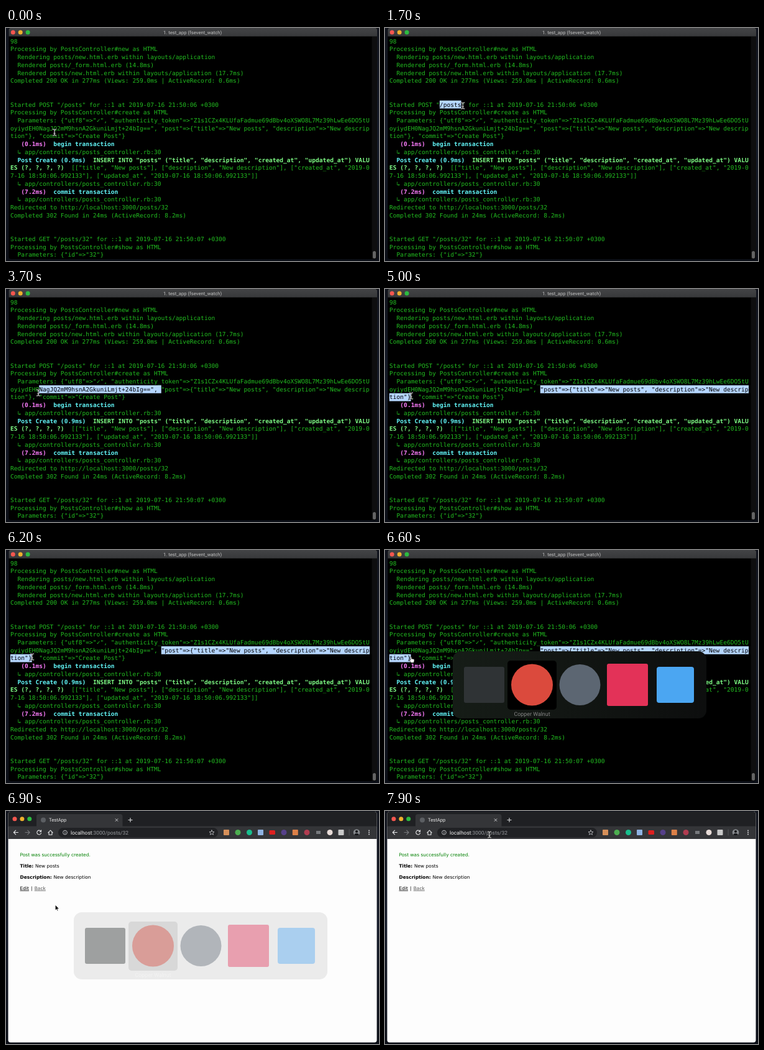
An HTML page with a canvas that plays this animation: 600x375 px, repeating every 8 s.

```html
<!DOCTYPE html>
<html lang="en">
<head>
<meta charset="utf-8">
<title>Terminal and browser</title>
<style>
html, body { margin: 0; width: 100%; height: 100%; overflow: hidden; background: #0d111a; }
canvas { display: block; width: 600px; height: 375px; }
</style>
</head>
<body>
<canvas id="stage"></canvas>
<script>
const canvas = document.getElementById('stage');
const ctx = canvas.getContext('2d');
const dpr = window.devicePixelRatio || 1;
canvas.width = 600 * dpr;
canvas.height = 375 * dpr;
ctx.scale(dpr, dpr);
ctx.textRendering = 'geometricPrecision';

const LOOP = 8000, STEP = 100;
const SWITCHER_ON = 6300, BROWSER_ON = 6700, FOCUS_ON = 6800, SWITCHER_OFF = 7100;
const MONO = '"DejaVu Sans Mono", monospace';
const SANS = 'Roboto, "Liberation Sans", sans-serif';
const PAGE = '"DejaVu Sans", sans-serif';

// ---------- drawing helpers ----------
function rect(x, y, w, h, fill, r = 0) {
  ctx.fillStyle = fill;
  ctx.beginPath();
  ctx.roundRect(x, y, w, h, r);
  ctx.fill();
}
function dot(x, y, r, fill) {
  ctx.fillStyle = fill;
  ctx.beginPath();
  ctx.arc(x, y, r, 0, Math.PI * 2);
  ctx.fill();
}
function label(str, x, y, font, fill, align = 'left') {
  ctx.font = font;
  ctx.fillStyle = fill;
  ctx.textAlign = align;
  ctx.fillText(str, x, y);
  return ctx.measureText(str).width;
}
function stroke(d, color, width = 1) {
  ctx.strokeStyle = color;
  ctx.lineWidth = width;
  ctx.stroke(new Path2D(d));
}
function gradient(x, y, ...colors) {
  const g = ctx.createLinearGradient(0, 0, x, y);
  colors.forEach((c, i) => g.addColorStop(i / (colors.length - 1), c));
  return g;
}
function lights(x, y) {
  ['#f5574f', '#eeb02d', '#2cbb40'].forEach((c, i) => dot(x + i * 11.9, y, 3.5, c));
}

// ---------- terminal ----------
const LEFT = 7, CELL = 5.78, ROW = 12.73, TOP = 15, COLS = 100;
const GREEN = '#22bd20', LIME = '#7dfa84', CYAN = '#62f6f8', PINK = '#f87af8';
const colX = c => LEFT + c * CELL;
const rowY = r => TOP + r * ROW;
const source = '  ↳ app/controllers/posts_controller.rb:30';

// Each line is plain text or a list of [text, colour]; colour means bold.
const lines = [
  '98',
  'Processing by PostsController#new as HTML',
  '  Rendering posts/new.html.erb within layouts/application',
  '  Rendered posts/_form.html.erb (14.8ms)',
  '  Rendered posts/new.html.erb within layouts/application (17.7ms)',
  'Completed 200 OK in 277ms (Views: 259.0ms | ActiveRecord: 0.6ms)',
  '', '',
  'Started POST "/posts" for ::1 at 2019-07-16 21:50:06 +0300',
  'Processing by PostsController#create as HTML',
  [['  Parameters: {"utf8"=>"'], ['✓'],
   ['", "authenticity_token"=>"Z1s1CZx4KLUfaFadmue69dBbv4oXSWO8L7Mz39hLwEe6DO5tU']],
  'oyiydEH0NagJQ2mM9hsnA2GkuniLmjt+24bIg==", "post"=>{"title"=>"New posts", "description"=>"New descrip',
  'tion"}, "commit"=>"Create Post"}',
  [['   (0.1ms)  ', PINK], ['begin transaction', CYAN]],
  source,
  [['  Post Create (0.9ms)  ', CYAN],
   ['INSERT INTO "posts" ("title", "description", "created_at", "updated_at") VALU', LIME]],
  [['ES (?, ?, ?, ?)', LIME],
   ['  [["title", "New posts"], ["description", "New description"], ["created_at", "2019-0']],
  '7-16 18:50:06.992133"], ["updated_at", "2019-07-16 18:50:06.992133"]]',
  source,
  [['   (7.2ms)  ', PINK], ['commit transaction', CYAN]],
  source,
  'Redirected to http://localhost:3000/posts/32',
  'Completed 302 Found in 24ms (ActiveRecord: 8.2ms)',
  '', '',
  'Started GET "/posts/32" for ::1 at 2019-07-16 21:50:07 +0300',
  'Processing by PostsController#show as HTML',
  '  Parameters: {"id"=>"32"}'
].map(l => typeof l === 'string' ? [[l]] : l);

function drawLine(r, color) {
  let col = 0;
  for (const [str, tint] of lines[r]) {
    const font = (tint ? 'bold ' : '') + '9.6px ' + MONO;
    label(str, colX(col), rowY(r) + 9.7, font, color || tint || GREEN);
    col += str.length;
  }
}

function highlight(r, from, to) {
  if (to <= from) return;
  ctx.save();
  ctx.beginPath();
  ctx.rect(colX(from), rowY(r), (to - from) * CELL, ROW);
  ctx.fillStyle = '#b5d6ff';
  ctx.fill();
  ctx.clip();
  drawLine(r, '#000');
  ctx.restore();
}

// ---------- pointer ----------
const track = [
  [0, 78, 168], [300, 78, 168], [800, 88, 124], [900, 88, 124], [1600, 125.2, 125],
  [1900, 125.2, 125], [2600, 250, 162], [2800, 250, 162], [3600, 52, 167],
  [3800, 52, 167], [4300, 42, 172], [6700, 42, 172], [7200, 134, 119],
  [7300, 152, 115], [7500, 152, 115], [7900, 168, 38], [8000, 168, 38]
];
// Presses: start, end, anchor row and column
const drags = [
  { down: 900, up: 1700, row: 8, col: 14 },
  { down: 2800, up: 4500, row: 11, col: 42 }
];

function pointer(t) {
  const i = track.findIndex((k, n) => n && t <= k[0]);
  const [t0, x0, y0] = track[i - 1], [t1, x1, y1] = track[i];
  let u = (t - t0) / (t1 - t0);
  if (t < BROWSER_ON) u = u * u * (3 - 2 * u);
  return { x: x0 + (x1 - x0) * u, y: y0 + (y1 - y0) * u };
}

function drawSelection(t) {
  const drag = drags.filter(d => d.down <= t).pop();
  if (!drag) return;
  const p = pointer(Math.min(t, drag.up));
  const a = drag.row * COLS + drag.col;
  const b = Math.floor((p.y - TOP) / ROW) * COLS + Math.round((p.x - LEFT) / CELL);
  const lo = Math.min(a, b), hi = Math.max(a, b);
  for (let r = Math.floor(lo / COLS); r * COLS < hi; r++) {
    highlight(r, Math.max(0, lo - r * COLS), Math.min(COLS, hi - r * COLS));
  }
}

function drawPointer(t) {
  const { x, y } = pointer(t);
  ctx.save();
  ctx.translate(x, y);
  ctx.lineJoin = ctx.lineCap = 'round';
  if (t >= SWITCHER_ON && t <= BROWSER_ON) {
    const hand = new Path2D('M-1.6 0.2Q-.6-1 .4.2L1 3.2 2 3 4 3.6 5 4.6V7L4 9.4H0L-2.6 6 -2.8 4.6 -1 5Z');
    ctx.fillStyle = '#fff';
    ctx.fill(hand);
    ctx.strokeStyle = '#222';
    ctx.lineWidth = .8;
    ctx.stroke(hand);
  } else if (t > BROWSER_ON && y > 46) {
    const arrow = new Path2D('M.5.5V9L2.5 7.2 3.8 10 5 9.4 3.8 6.8H6.5Z');
    ctx.fillStyle = '#000';
    ctx.fill(arrow);
    ctx.strokeStyle = '#fff';
    ctx.lineWidth = .6;
    ctx.stroke(arrow);
  } else {
    const beam = 'M-2.5-5Q0-5 0-3.5Q0-5 2.5-5M0-4V4M-2.5 5Q0 5 0 3.5Q0 5 2.5 5M-1 1.5H1';
    stroke(beam, '#333', 2);
    stroke(beam, '#ddd', .9);
  }
  ctx.restore();
}

function drawTerminal(t) {
  rect(4.5, 0, 592.5, 372, '#000', [0, 0, 4, 4]);
  rect(588.5, 13.5, 8.5, 358, '#0e0e0f', [0, 0, 4, 0]);
  rect(4.5, 0, 592.5, 13.5, gradient(0, 14, '#434446', '#37383a'), [3, 3, 0, 0]);
  lights(11.3, 7);
  label('1. test_app (fsevent_watch)', 300, 10, '7.7px ' + SANS, '#c4c4c4', 'center');
  lines.forEach((_, r) => drawLine(r));
  drawSelection(t);
  rect(590, 359, 5, 12, '#646464', 2.5);
}

// ---------- browser ----------
function drawToolbar(focused) {
  const light = focused ? '#e4e5e7' : '#a4a6a9', dim = focused ? '#77797d' : '#606266';
  ctx.lineCap = ctx.lineJoin = 'round';
  stroke('M19.5 34.5H12.5M15.7 31.2L12.4 34.5 15.7 37.8', light, 1.1);
  stroke('M31 34.5H38M34.8 31.2L38.1 34.5 34.8 37.8', dim, 1.1);
  stroke('M56 32.6A3.4 3.4 0 1 0 56.5 35.4M56.6 30.8V33.2H54.2', light, 1.1);
  stroke('M67.8 34.8L71.5 31.2 75.2 34.8M69 34V38.2H74V34', light, 1.1);

  rect(84, 27, 257, 15.5, '#202124', 7.75);
  stroke('M98.4 34.6A3.4 3.4 0 1 1 91.6 34.6A3.4 3.4 0 1 1 98.4 34.6M95 34.4V36.3M95 32.8V32.9', '#c4c6c9', .9);
  const url = '8.45px ' + SANS;
  const w = label('localhost', 104, 37.8, url, '#f0f0f0');
  label(':3000/posts/32', 104 + w, 37.8, url, focused ? '#9a9da1' : '#dcdcdc');
  stroke('M331 30.8L332.1 33.4 335 33.6 332.8 35.4 333.5 38.2 331 36.7 328.5 38.2 329.2 35.4 327 33.6 329.9 33.4Z', '#c4c6c9', .8);

  const squares = [[354.5, '#d6905a'], [409.5, '#8eb2e2'], [465.3, '#dc8048'], [539, '#c9c9c9']];
  const discs = [[373, '#4cae50'], [391.5, '#18bf8e'], [447, '#56408a'], [484, '#b03c50'], [521, '#e8dcd8']];
  for (const [x, c] of squares) rect(x - 4.5, 30, 9, 9, c, 1);
  for (const [x, c] of discs) dot(x, 34.5, 4.5, c);
  rect(423.5, 31, 9.5, 7, '#dd2020', 1.5);
  rect(499, 32, 7, 5, '#77797d');
  rect(551.6, 29.5, 1, 10, '#55575a');

  // Profile silhouette
  ctx.save();
  ctx.beginPath();
  ctx.arc(564, 34.5, 5.3, 0, 7);
  ctx.clip();
  rect(558, 29, 12, 12, '#84878b');
  dot(564, 33, 2.1, '#16171a');
  dot(564, 40, 4, '#16171a');
  ctx.restore();
  for (const y of [31.5, 34.5, 37.5]) dot(584, y, .9, light);
}

function drawPage() {
  const reg = '7.48px ' + PAGE, bold = 'bold ' + reg, x = 22.5;
  const field = (name, value, y) => {
    const w = label(name + ' ', x, y, bold, '#000');
    label(value, x + w, y, reg, '#000');
  };
  const link = (str, lx, color) => {
    const w = label(str, lx, 126.8, reg, color);
    rect(lx, 127.8, w, .8, color);
  };
  label('Post was successfully created.', x, 73, reg, '#008000');
  field('Title:', 'New posts', 91);
  field('Description:', 'New description', 109);
  link('Edit', x, '#000');
  label('|', 40, 126.8, reg, '#000');
  link('Back', 45.7, '#555');
}

function drawBrowser(t) {
  const focused = t >= FOCUS_ON;
  rect(3.5, 1, 593, 371.5, '#fdfdfd', 4);
  rect(3.5, 1, 593, 24, focused ? '#1f2023' : '#2b2c2f', [4, 4, 0, 0]);
  rect(3.5, 24.5, 593, 20.5, '#343538');
  rect(49, 5, 138.5, 20, '#343538', [4, 4, 0, 0]);
  lights(14, 12.8);
  dot(60, 14.5, 4, '#5c5f63');
  label('TestApp', 69, 17.3, '7.7px ' + SANS, '#e8e8e8');
  ctx.lineCap = 'butt';
  stroke('M175.8 12.3L180.2 16.7M180.2 12.3L175.8 16.7', '#c8c9cb', 1);
  stroke('M196.5 14.5H203.5M200 11V18', '#d8d9db', 1.1);
  drawToolbar(focused);
  drawPage();
}

// ---------- app switcher ----------
function drawSwitcher(t) {
  if (t < SWITCHER_ON || t >= SWITCHER_OFF) return;
  const onPage = t >= BROWSER_ON;
  ctx.save();
  if (onPage) ctx.globalAlpha = .82 * (1 - (t - BROWSER_ON) / (SWITCHER_OFF - BROWSER_ON));
  rect(109, 163, 408, 108, onPage ? '#d0d0d0' : gradient(517, 0, '#182019', '#0d0e0e'), 13);
  rect(197, 178, 79, 79, onPage ? '#bbb' : '#000', 5);
  rect(127, 188, 65, 58, '#2f3335', 3);
  dot(236.5, 217, 33.5, '#db4a3d');
  dot(313.5, 217, 33, '#5c6672');
  rect(357, 183, 66, 68, '#e33258', 3);
  rect(437, 188, 60, 58, '#4ba6f2', 4);
  label('Copper Walnut', 236.5, 267, '8.9px ' + SANS, onPage ? '#fff' : '#858585', 'center');
  ctx.restore();
}

function draw(t) {
  rect(0, 0, 600, 375, gradient(0, 375, '#10131c', '#151b29', '#0b0e16'));
  if (t < BROWSER_ON) drawTerminal(t);
  else drawBrowser(t);
  drawSwitcher(t);
  drawPointer(t);
}

function tick() {
  draw(Math.floor(performance.now() % LOOP / STEP) * STEP);
  requestAnimationFrame(tick);
}
tick();
</script>
</body>
</html>
```
